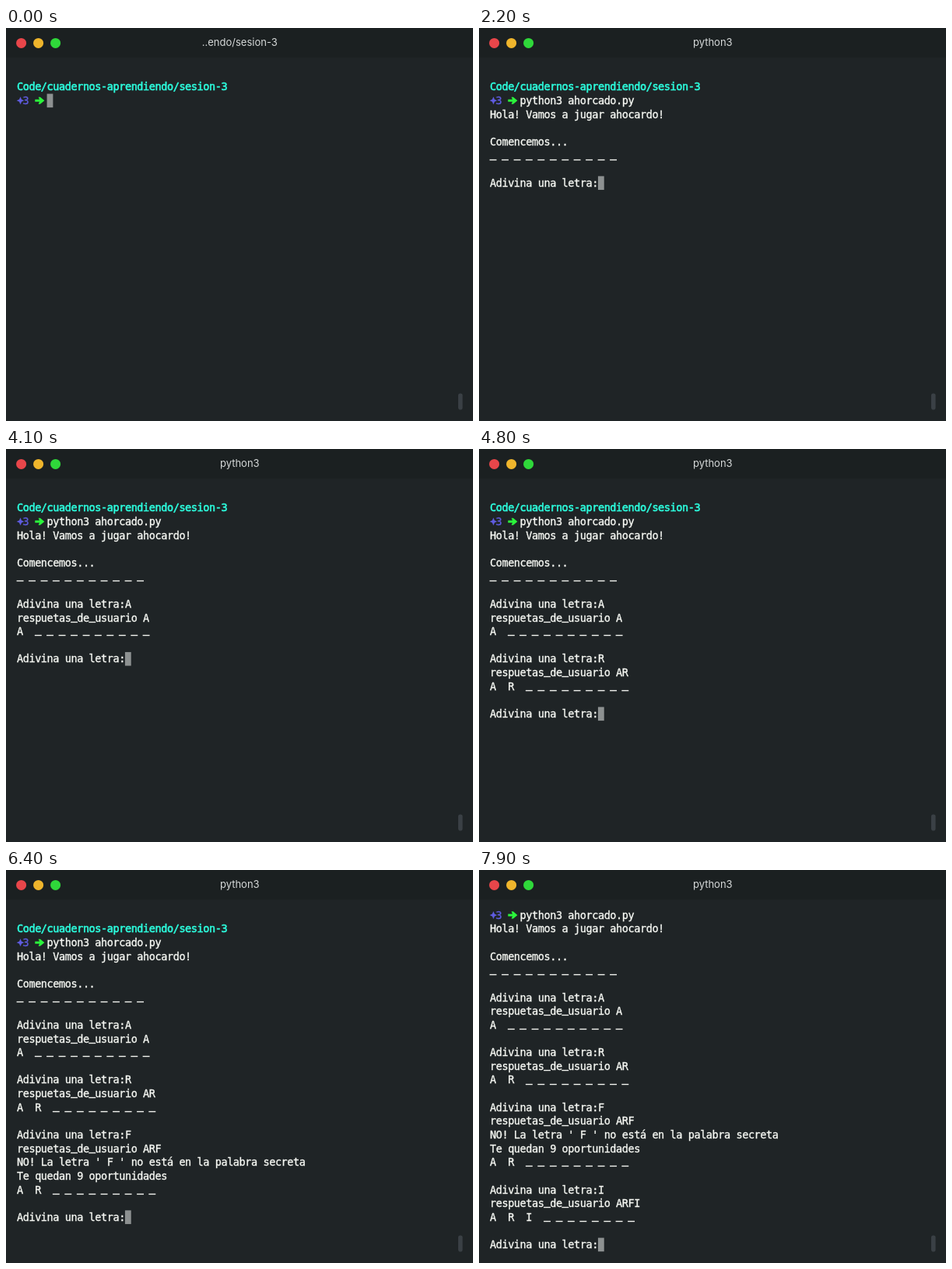
Animation, 600 px wide and 505 px high, one loop 8 s. Source, as an HTML page:

```html
<!DOCTYPE html>
<html lang="es">
<head>
<meta charset="utf-8">
<title>Terminal</title>
<style>
  html, body { margin: 0; width: 100%; height: 100%; overflow: hidden; background: #1f2426; }
  svg { display: block; width: 600px; height: 505px; }
  text { white-space: pre; }
  .title { font: 13px Inter, Roboto, sans-serif; fill: #d6d9d9; text-anchor: middle; }
  .line {
    font: 13.5px "DejaVu Sans Mono", "Liberation Mono", monospace;
    letter-spacing: -0.409px;
    fill: #f6f8f3; stroke: #f6f8f3; stroke-width: 0.35px;
  }
  .path { fill: #2cfbdc; stroke: #2cfbdc; stroke-width: 0.6px; }
  .count { fill: #5f5ce0; stroke: #5f5ce0; }
</style>
</head>
<body>
<svg viewBox="0 0 600 505">
  <rect width="600" height="505" fill="#1f2426"/>
  <rect width="600" height="38" fill="#1b2021"/>
  <circle cx="19.6" cy="19.4" r="6.5" fill="#e8464a"/>
  <circle cx="41.6" cy="19.4" r="6.5" fill="#efb52c"/>
  <circle cx="63.6" cy="19.4" r="6.5" fill="#2fd83a"/>
  <text id="title" class="title" x="300.3" y="22.6"></text>
  <rect id="cursor" width="7.8" height="17.6" fill="#8d9191"/>
  <g id="lines"></g>
  <g id="prompt">
    <path d="M18.5 -5L20 -1.5L23.3 0L20 1.5L18.5 5L17 1.5L13.7 0L17 -1.5Z" fill="#5f5ce0"/>
    <text class="line count" x="21.5" y="4.9">3</text>
    <path d="M37.3 -1.5H43L41.6 -4.6H44L49.4 0L44 4.6H41.6L43 1.5H37.3Z" fill="#2bf43c"/>
  </g>
  <rect x="581" y="469.5" width="5.6" height="21" rx="2.8" fill="#3a4045"/>
</svg>
<script>
const LOOP = 8000;
const LEFT = 14, TOP = 66.6, CELL = 7.718, ROW = 17.64;
const LAST_ROW = 23;      // lowest row that fits before the screen scrolls
const START = 600;        // the command is launched

const ask = "\n\nAdivina una letra:";
const blanks = n => Array(n).fill("_").join(" ");
const word = found => [...found].map(c => c + "  ").join("") + blanks(11 - found.length);
const reply = (used, found, note = "") =>
  `\nrespuetas_de_usuario ${used}\n${note}${word(found)}${ask}`;
const miss = "NO! La letra ' F ' no está en la palabra secreta\nTe quedan 9 oportunidades\n";

// Everything written to the screen: [ms, text]
const output = [
  [0, "Code/cuadernos-aprendiendo/sesion-3\n     "],
  [300, "python3 ahorcado.py"],
  [START, "\n"],
  [700, "Hola! Vamos a jugar ahocardo!\n\n"],
  [1700, "Comencemos...\n"],
  [2200, word("") + ask],
  [2500, "A"],
  [2900, reply("A", "A")],
  [4300, "R"],
  [4700, reply("AR", "AR")],
  [5300, "F"],
  [6000, reply("ARF", "AR", miss)],
  [7300, "I"],
  [7900, reply("ARFI", "ARI")]
];

const byId = id => document.getElementById(id);
const title = byId("title"), cursor = byId("cursor");
const lines = byId("lines"), prompt = byId("prompt");

function add(parent, name, attrs, content = "") {
  const node = document.createElementNS("http://www.w3.org/2000/svg", name);
  for (const key in attrs) node.setAttribute(key, attrs[key]);
  node.textContent = content;
  return parent.appendChild(node);
}

// Underscores sit close to the baseline and are a little heavier
function drawLine(content, row, top) {
  const node = add(lines, "text", { class: row ? "line" : "line path", x: LEFT, y: top + 13.8 });
  let lift = 0;
  for (const part of content.split(/(_)/).filter(Boolean)) {
    const rule = part === "_", want = rule ? -2.8 : 0;
    const span = add(node, "tspan", { dy: want - lift }, part);
    if (rule) span.style.strokeWidth = "0.8px";
    lift = want;
  }
}

let shown = "";
function render(ms) {
  const screen = output.filter(([at]) => at <= ms).map(step => step[1]).join("");
  title.textContent = ms < START ? "..endo/sesion-3" : "python3";
  if (screen === shown) return;
  shown = screen;

  const rows = screen.split("\n"), last = rows.length - 1;
  const scroll = Math.max(0, last - LAST_ROW);
  const topOf = row => TOP + (row - scroll) * ROW;
  lines.replaceChildren();
  rows.forEach((content, row) => {
    if (topOf(row) > 45) drawLine(content, row, topOf(row));
  });
  prompt.setAttribute("transform", `translate(0 ${topOf(1) + 9})`);
  cursor.setAttribute("x", LEFT + rows[last].length * CELL);
  cursor.setAttribute("y", topOf(last) + 0.3);
}

const begin = performance.now();
function tick() {
  render((performance.now() - begin) % LOOP);
  requestAnimationFrame(tick);
}
tick();
</script>
</body>
</html>
```
